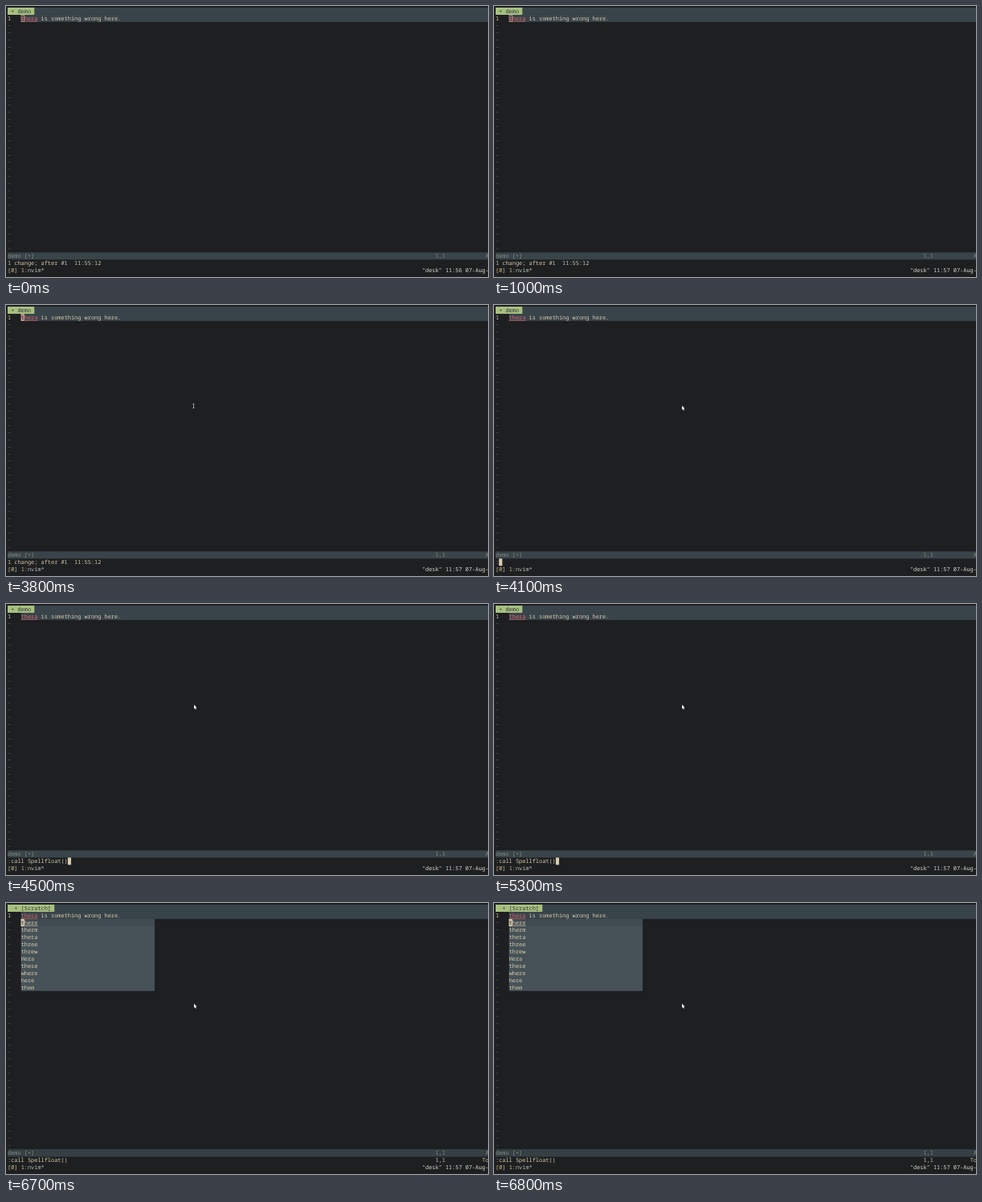
An HTML page that plays this animation: 600 by 338 pixels, repeating every 8000 ms.

```html
<!DOCTYPE html>
<html lang="en">
<head>
<meta charset="utf-8">
<title>Spelling popup</title>
<style>
  html, body { margin: 0; width: 100%; height: 100%; overflow: hidden; background: #1d1f21; }
  svg { display: block; width: 600px; height: 338px; }
  text {
    font: 6.93px "Noto Sans Mono", "DejaVu Sans Mono", monospace;
    white-space: pre;
    text-rendering: geometricPrecision;
  }
</style>
</head>
<body>
<svg id="stage" viewBox="0 0 600 338"></svg>
<script>
const LOOP = 8000, CELL = 4.16, ROW = 8.98, PAD = 2;
const C = {
  bg: '#1d1f21', line: '#39444a', float: '#465258', fg: '#d8caac', red: '#d9696f',
  green: '#a7c080', dark: '#2b3338', grey: '#868d80', dim: '#5a6468', cursor: '#d8caac'
};
const stage = document.getElementById('stage');
const timed = [];
const X = col => PAD + col * CELL;
const Y = row => PAD + row * ROW;

function add(tag, attrs, span) {
  const el = document.createElementNS('http://www.w3.org/2000/svg', tag);
  for (const k in attrs) el.setAttribute(k, attrs[k]);
  stage.append(el);
  if (span) timed.push({ el, span });
  return el;
}
function fill(col, row, cols, rows, color, span) {
  return add('rect', { x: X(col), y: Y(row), width: cols * CELL, height: rows * ROW, fill: color }, span);
}
function write(col, row, str, color, span) {
  add('text', { x: X(col), y: Y(row) + 6.9, fill: color }, span).textContent = str;
}
function underline(col, row, cols, color, span) {
  add('rect', { x: X(col), y: Y(row) + 7.9, width: cols * CELL, height: 0.7, fill: color }, span);
}
function cursor(col, row, ch, span, color = C.cursor) {
  fill(col, row, 1, 1, color, span);
  write(col, row, ch, C.dark, span);
}

// When things happen, in ms
const MINUTE = 1000, FOCUS = 2800, MOVE = 3000, COLON = 4000, RECALL = 4500,
      ENTER = 6500, POPUP = 6700;
const before = [0, POPUP], after = [POPUP, LOOP];

// Tab line
fill(0, 0, 144, 1, C.line);
fill(0, 0, 8, 1, C.green, before);
write(0, 0, ' + demo ', C.dark, before);
fill(0, 0, 14, 1, C.green, after);
write(0, 0, '  + [Scratch] ', C.dark, after);

// Buffer
fill(4, 1, 140, 1, C.line);
write(0, 1, '1', C.fg);
write(4, 1, 'thera', C.red);
underline(4, 1, 5, C.red);
write(10, 1, 'is something wrong here.', C.fg);
write(34, 1, '·', C.dim);
for (let r = 2; r < 34; r++) write(0, r, '~', C.dim);

// Hollow cursor until the window takes focus
add('rect', { x: X(4) + 0.4, y: Y(1) + 0.4, width: CELL - 0.6, height: ROW - 0.8,
  fill: 'none', stroke: '#b98a80', 'stroke-width': 0.8 }, [0, FOCUS]);
cursor(4, 1, 't', [FOCUS, COLON], '#c9958c');

// Suggestions
fill(4, 2, 40, 10, C.float, after);
fill(4, 2, 40, 1, '#414c52', after);
'there therm theta three threw Hera these where here them'.split(' ')
  .forEach((word, i) => write(4, 2 + i, word, C.fg, after));
underline(4, 2, 5, C.fg, after);
cursor(4, 2, 't', after);

// Status line
fill(0, 34, 144, 1, C.line);
fill(0, 34, 144, 1, '#353f44', after);
write(0, 34, 'demo [+]', C.grey);
write(128, 34, '1,1', C.grey);
write(143, 34, 'All', C.grey);

// Command line
const command = ':call Spellfloat()';
write(0, 35, '1 change; after #1  11:55:12', C.fg, [0, COLON]);
write(0, 35, ':', C.fg, [COLON, RECALL]);
cursor(1, 35, '', [COLON, RECALL]);
write(0, 35, command, C.fg, [RECALL, LOOP]);
cursor(command.length, 35, '', [RECALL, ENTER]);
cursor(0, 35, ':', [ENTER, POPUP]);
write(128, 35, '1,1', C.fg, after);
write(142, 35, 'Top', C.fg, after);

// Multiplexer bar
write(0, 36, '[0]', '#cfc48f');
write(4, 36, '1:', '#d9bb80');
write(6, 36, 'nvim*', '#b3c0b4');
const clock = m => `"desk" 11:${m} 07-Aug-21`;
write(124, 36, clock(56), '#dedad0', [0, MINUTE]);
write(124, 36, clock(57), '#dedad0', [MINUTE, LOOP]);

// Mouse
const arrow = add('path', { d: 'M0 0V5.2L1 4.6 1.8 6.2 2.8 5.8 2.3 4.2 3.3 3.6Z', fill: '#f2f2f2' });
const beam = add('path', { d: 'M-1 0H1M0 0V5M-1 5H1', fill: 'none', stroke: '#d4d4d4', 'stroke-width': 0.7 });
const path = [[MOVE, 227, 6], [3100, 231, 78], [3200, 234, 125.4]];
beam.setAttribute('transform', 'translate(233.5 123.4)');

function draw(t) {
  for (const { el, span: [a, b] } of timed) el.style.display = t >= a && t < b ? '' : 'none';
  const at = path.filter(p => t >= p[0]).pop();
  const typing = t >= 3800 && t < COLON;
  beam.style.display = typing ? '' : 'none';
  arrow.style.display = at && !typing ? '' : 'none';
  if (at) arrow.setAttribute('transform', `translate(${at[1]} ${at[2]})`);
}
const start = performance.now();
function tick() {
  draw((performance.now() - start) % LOOP);
  requestAnimationFrame(tick);
}
tick();
</script>
</body>
</html>
```
